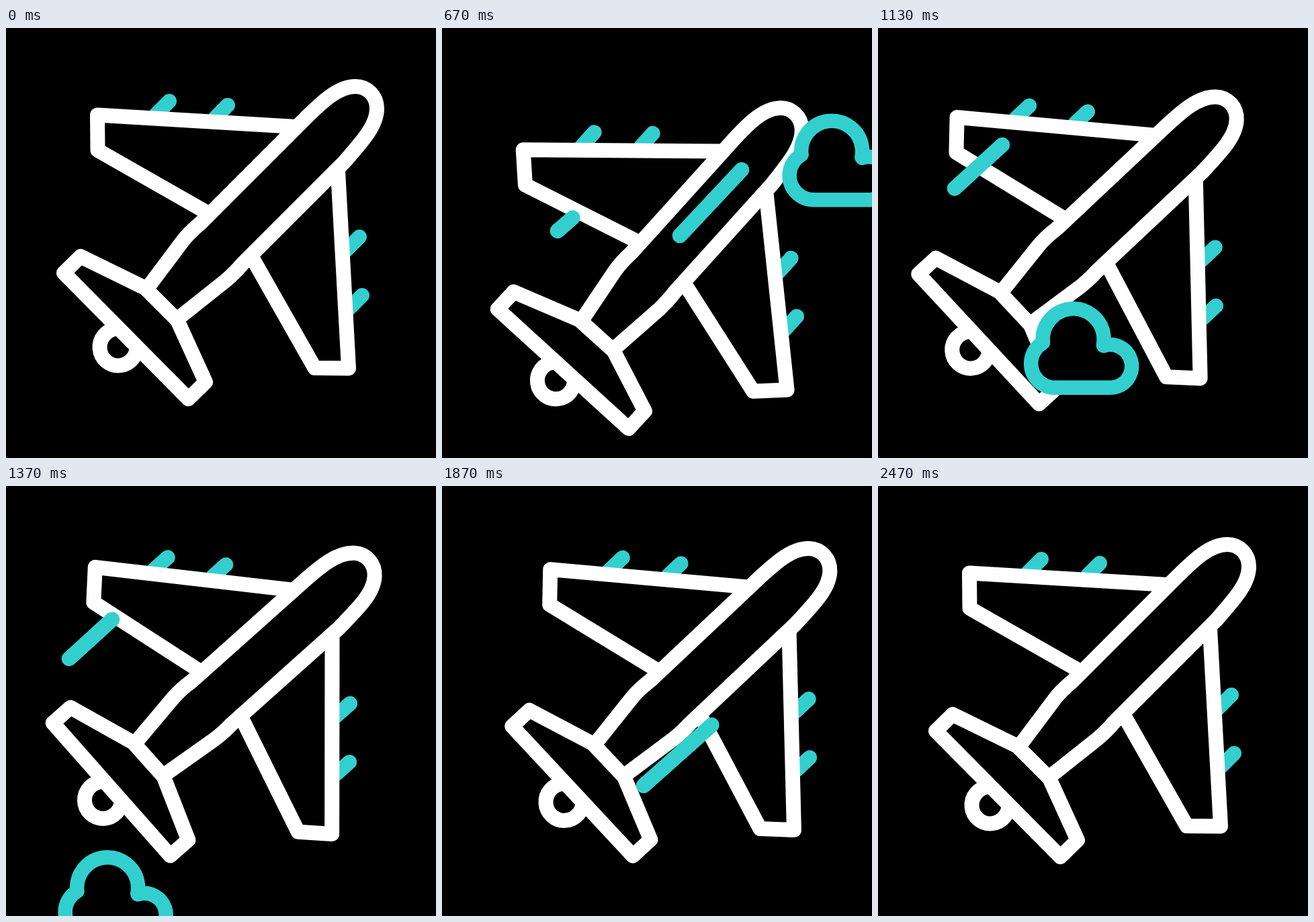
These frames come from a looping animation (640 px wide and 640 px high, 2.5 s). An HTML page with a canvas:

```html
<!DOCTYPE html>
<html lang="en">
<head>
<meta charset="utf-8">
<title>Plane</title>
<style>
html, body { margin: 0; width: 100%; height: 100%; overflow: hidden; background: #000; }
canvas { display: block; width: 640px; height: 640px; }
</style>
</head>
<body>
<canvas id="stage" width="640" height="640"></canvas>
<script>
const ctx = document.getElementById("stage").getContext("2d");
const LOOP = 2500;
const WHITE = "#fff";
const TEAL = "#33cfcf";
const RAD = Math.PI / 180;

// [time, value] keys, eased between neighbours
const planeX = [[0, 0], [450, 0], [1150, -24.5], [1225, -24.5], [1715, 24.5], [2250, 0], [LOOP, 0]];
const planeY = [[0, 0], [128, 0], [543, 45], [1345, 1.3], [1750, 0], [LOOP, 0]];
const planeTilt = [[0, 0], [543, -3], [625, -3], [1355, 3.2], [2430, 0], [LOOP, 0]];
const cloudMove = [[257, -272], [1743, 362]];

const streaks = [
  { start: 60, from: [315, 178], to: [172, 302] },
  { start: 343, from: [446, 211], to: [354, 309] },
  { start: 900, from: [185, 174], to: [94, 257] },
  { start: 1445, from: [418, 341], to: [300, 446] }
];

const wings = new Path2D(
  "M431 147 L136 129.5 L136.5 182 L298 274 " +
  "M367 343 L459.5 506 L510 506.5 L494 213");
const body = new Path2D(
  "M212 385 L263 317 Q272 305 290 290 L443 137 C472 108 495 87 520 87 " +
  "C538 87 552 101 552 120 C552 145 531 168 503 200 L351 352 Q341 364 327 376 L259 430");
const tail = new Path2D("M86 364.5 L111 340 L207 387 L255 435 L297 527 L271.5 552 Z");
const wingDashes = new Path2D(
  "M243 109 L223 129 M330 115 L312 133 M526 311 L506 331 M530 398 L511 417");

const tailLoop = new Path2D();
tailLoop.arc(167, 475, 27.5, -5 * RAD, 275 * RAD);

const cloud = new Path2D();
cloud.arc(397, 372, 36, 90 * RAD, 240 * RAD);
cloud.arc(424, 336, 45.5, 174 * RAD, 371 * RAD);
cloud.arc(479, 376, 32, 252 * RAD, 450 * RAD);
cloud.closePath();

function ease(t, start, end) {
  const u = Math.min(1, Math.max(0, (t - start) / (end - start)));
  return u * u * (3 - 2 * u);
}

function valueAt(keys, t) {
  let value = keys[0][1];
  for (let i = 1; i < keys.length; i++) {
    value += (keys[i][1] - keys[i - 1][1]) * ease(t, keys[i - 1][0], keys[i][0]);
  }
  return value;
}

function stroke(path, color, width, cap = "round") {
  ctx.strokeStyle = color;
  ctx.lineWidth = width;
  ctx.lineCap = cap;
  ctx.stroke(path);
}

function drawPlane(t) {
  ctx.save();
  ctx.translate(320 + valueAt(planeX, t), 320 + valueAt(planeY, t));
  ctx.rotate(valueAt(planeTilt, t) * RAD);
  ctx.translate(-320, -320);
  stroke(wingDashes, TEAL, 22);
  stroke(tailLoop, WHITE, 22, "butt");
  for (const part of [wings, body, tail]) stroke(part, WHITE, 22);
  ctx.restore();
}

function drawStreak({ start, from, to }, t) {
  const age = t - start;
  if (age <= 0 || age >= 700) return;
  const point = k => from.map((v, i) => v + (to[i] - v) * k);
  const line = new Path2D();
  line.moveTo(...point(ease(age, 340, 700)));
  line.lineTo(...point(ease(age, 0, 330)));
  stroke(line, TEAL, 22.5);
}

function drawCloud(t) {
  if (t < 257 || t > 1743) return;
  const shift = valueAt(cloudMove, t);
  ctx.save();
  ctx.translate(-1.035 * shift - 1.5, shift);
  ctx.fillStyle = "#000";
  ctx.fill(cloud);
  stroke(cloud, TEAL, 21.5);
  ctx.restore();
}

function draw(t) {
  ctx.fillStyle = "#000";
  ctx.fillRect(0, 0, 640, 640);
  ctx.lineJoin = "round";
  drawPlane(t);
  for (const streak of streaks) drawStreak(streak, t);
  drawCloud(t);
}

let origin = null;
function loop(now) {
  origin ??= now;
  draw((now - origin) % LOOP);
  requestAnimationFrame(loop);
}
requestAnimationFrame(loop);
</script>
</body>
</html>
```
